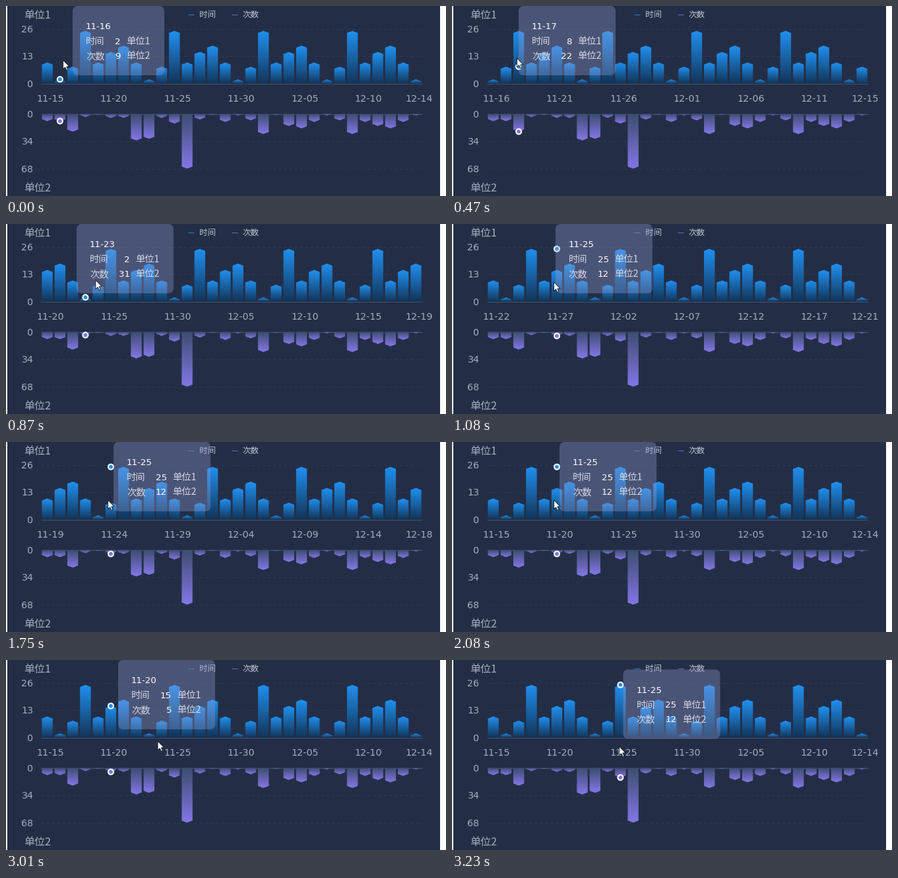
Write a matplotlib script that moves like this. It is 667 px wide and 288 px high and loops after 3290 ms.

```python
import matplotlib.pyplot as plt
import numpy as np
from matplotlib.animation import FuncAnimation
from matplotlib.patches import Circle, FancyBboxPatch, Polygon, Rectangle

W, H, DPI = 667, 288, 100
LOOP, TICK, BEATS = 3290, 10, 49
PX = 72 / DPI
CJK, DIGITS = "Noto Sans CJK JP", "DejaVu Sans"

BACK, GRID, AXIS = "#232e46", "#2e3a52", "#445069"
MUTED, SOFT, LIGHT = "#a5adbe", "#bcc2d0", "#d3d8e6"
BLUE, PURPLE = "#2490ee", "#8377e6"

# Daily data from 11-15 on; the hours repeat every week.
HOURS = [10, 2, 8, 25, 10, 15, 18]
COUNTS = ([9, 9, 22, 4, 1, 5, 5, 33, 31, 5, 12, 68, 7, 1]
          + HOURS[:4] + [1] + HOURS[5:] + HOURS + HOURS[:2])
BARS, X0, STEP = 30, 62.6, 19.27
TOP_ZERO, TOP_UNIT = 117.5, 41.5 / 13
LOW_ZERO, LOW_UNIT = 163.5, 41.5 / 34

# Key points over beats: (beat, first day shown) and (beat, x, y).
SCROLL = np.array([(6, 0), (11, 5), (14, 5), (17, 8), (20, 5),
                   (25, 5), (27, 3), (28, 3), (31, 0)])
POINTER = np.array([(4, 86.5, 82), (6, 98.5, 79), (11, 98.5, 79),
                    (14, 154.5, 88), (31, 154.5, 88), (34, 161.5, 102),
                    (43, 161.5, 102), (44, 230, 123), (45, 253.5, 131)])
ARROW = np.array([(0, 0), (0, 13.6), (3.1, 10.8), (5.3, 15.6), (7.5, 14.6),
                  (5.4, 10), (9.6, 9.7)])


def along(path, beat):
    return np.array([np.interp(beat, path[:, 0], col) for col in path.T[1:]])


def day(i):
    return f"11-{15 + i}" if i <= 15 else f"12-{i - 15:02d}"


def hours(i):
    return HOURS[i % 7]


def simulate():
    """The hover follows the pointer one beat late, the tooltip eases after it."""
    states, slot, shown = [], 1, 1
    tip = np.array([101.0, 0.0])
    for beat in range(BEATS):
        seen = along(POINTER, beat - 1)
        if (seen != along(POINTER, beat - 2)).any():
            slot = round((seen[0] - X0) / STEP)
            shown = slot + round(along(SCROLL, beat - 1)[0])
        goal = np.maximum(along(POINTER, beat - 2) + (8.5, -116), (101, 0))
        tip = tip + 0.75 * (goal - tip)
        start = round(along(SCROLL, beat)[0])
        states.append((start, slot, shown, tip, along(POINTER, beat)))
    return states


def bar_layer(values, zero, unit, near, far):
    """Pointed gradient bars as one RGBA image; a negative unit points down."""
    img = np.zeros((H, W, 4))
    ys = np.arange(H)[:, None] + 0.5
    side = np.sign(unit)
    for i, value in enumerate(values):
        cx, size = X0 + i * STEP, value * abs(unit)
        left = int(cx) - 10
        off = np.abs(np.arange(left, left + 20) + 0.5 - cx)[None, :]
        rise = side * (zero - ys)
        slope = min(3, size) * off / 8
        cover = (np.clip(8.7 - off, 0, 1) * np.clip(size - slope - rise + 0.5, 0, 1)
                 * np.clip(rise + 0.5, 0, 1))
        mix = np.clip(rise / size, 0, 1)[..., None]
        color = (np.array(near) * (1 - mix) + np.array(far) * mix) / 255
        part = img[:, left:left + 20]
        part[..., :3] = np.where(cover[..., None] > 0, color, part[..., :3])
        part[..., 3] = np.maximum(part[..., 3], cover)
    return img


fig = plt.figure(figsize=(W / DPI, H / DPI), dpi=DPI, facecolor="white")
ax = fig.add_axes([0, 0, 1, 1])


def label(x, y, s, size, color, ha="left", z=3, font=CJK):
    return ax.text(x, y + 0.37 * size, s, fontsize=size * PX, color=color, ha=ha,
                   va="baseline", family=font, zorder=z)


def place(text, x, y):
    text.set_position((x, y + 0.37 * text.get_fontsize() / PX))


def line(x1, x2, y, color, style="-", alpha=1):
    ax.plot([x1, x2], [y, y], color=color, lw=PX, ls=style, alpha=alpha, zorder=1,
            solid_capstyle="butt")


def picture(img):
    return ax.imshow(img, extent=(0, W, H, 0), interpolation="nearest",
                     aspect="auto", zorder=2)


ax.add_patch(Rectangle((2, 0), 656, H, color=BACK, lw=0, zorder=0))
for zero, step in ((TOP_ZERO, -13), (LOW_ZERO, 34)):
    line(53, 631, zero, AXIS)
    for k in range(3):
        y = zero + 41.5 * k * np.sign(step)
        label(41.5, y, str(abs(k * step)), 14.2, MUTED, "right", font=DIGITS)
        if k:
            line(53, 631, y, GRID, (0, (4, 4)))
label(47.5, 13, "单位1", 16, MUTED, "center")
label(47.5, 275, "单位2", 16, MUTED, "center")
for x, s, color in ((276, "时间", BLUE), (342, "次数", PURPLE)):
    line(x, x + 9, 12.5, color, alpha=0.8)
    label(x + 17, 12.3, s, 12.5, SOFT)

STATES = simulate()
TOPS = [bar_layer([hours(s + i) for i in range(BARS)], TOP_ZERO, TOP_UNIT,
                  (18, 52, 88), (32, 144, 240))
        for s in range(max(state[0] for state in STATES) + 1)]
top_bars = picture(TOPS[0])
picture(bar_layer(COUNTS, LOW_ZERO, -LOW_UNIT, (62, 76, 112), (132, 119, 232)))
ax.set(xlim=(0, W), ylim=(H, 0))
ax.axis("off")

TICKS = [*range(0, BARS, 5), BARS - 1]
dates = [label(X0 + 4.8 + i * STEP, 139.5, "", 14.2, MUTED, "center", font=DIGITS)
         for i in TICKS]

dots = [ax.add_patch(Circle((0, 0), 4, fc=c, ec="white", lw=2 * PX, zorder=4))
        for c in (BLUE, PURPLE)]
box = ax.add_patch(FancyBboxPatch(
    (0, 0), 139, 105, boxstyle="round,pad=0,rounding_size=8",
    fc=(0.59, 0.62, 0.83, 0.34), lw=0, zorder=5))
title = label(0, 0, "", 13.4, "white", z=6, font=DIGITS)
rows = [(label(0, 0, name, 14.3, LIGHT, z=6),
         label(0, 0, "", 13.4, "white", "right", 6, DIGITS),
         label(0, 0, unit, 14.3, LIGHT, z=6))
        for name, unit in (("时间", "单位1"), ("次数", "单位2"))]
arrow = ax.add_patch(Polygon(ARROW, fc="white", ec="#10141f", lw=0.9 * PX, zorder=8))


def draw(frame):
    beat = int((frame * TICK + 8) * BEATS / LOOP)
    start, slot, shown, (x, y), pointer = STATES[beat]
    top_bars.set_data(TOPS[start])
    for text, i in zip(dates, TICKS):
        text.set_text(day(start + i))

    # The tooltip keeps the day it was opened on while the bars scroll on.
    cx = X0 + slot * STEP
    dots[0].center = cx, TOP_ZERO - hours(shown) * TOP_UNIT
    dots[1].center = cx, LOW_ZERO + COUNTS[slot] * LOW_UNIT

    values = str(hours(shown)), str(COUNTS[shown])
    extra = 8 * (max(map(len, values)) - 1)
    box.set_bounds(x, y, 139 + extra, 105)
    title.set_text(day(shown))
    place(title, x + 20, y + 30.5)
    for k, (name, value, unit) in enumerate(rows):
        row = y + 53 + 22 * k
        value.set_text(values[k])
        place(name, x + 20, row)
        place(value, x + 73 + extra, row)
        place(unit, x + 81.5 + extra, row)
    arrow.set_xy(ARROW + pointer)
    return []


anim = FuncAnimation(fig, draw, frames=LOOP // TICK, interval=TICK,
                     init_func=lambda: draw(0), repeat=True, repeat_delay=0)
plt.show()
```
